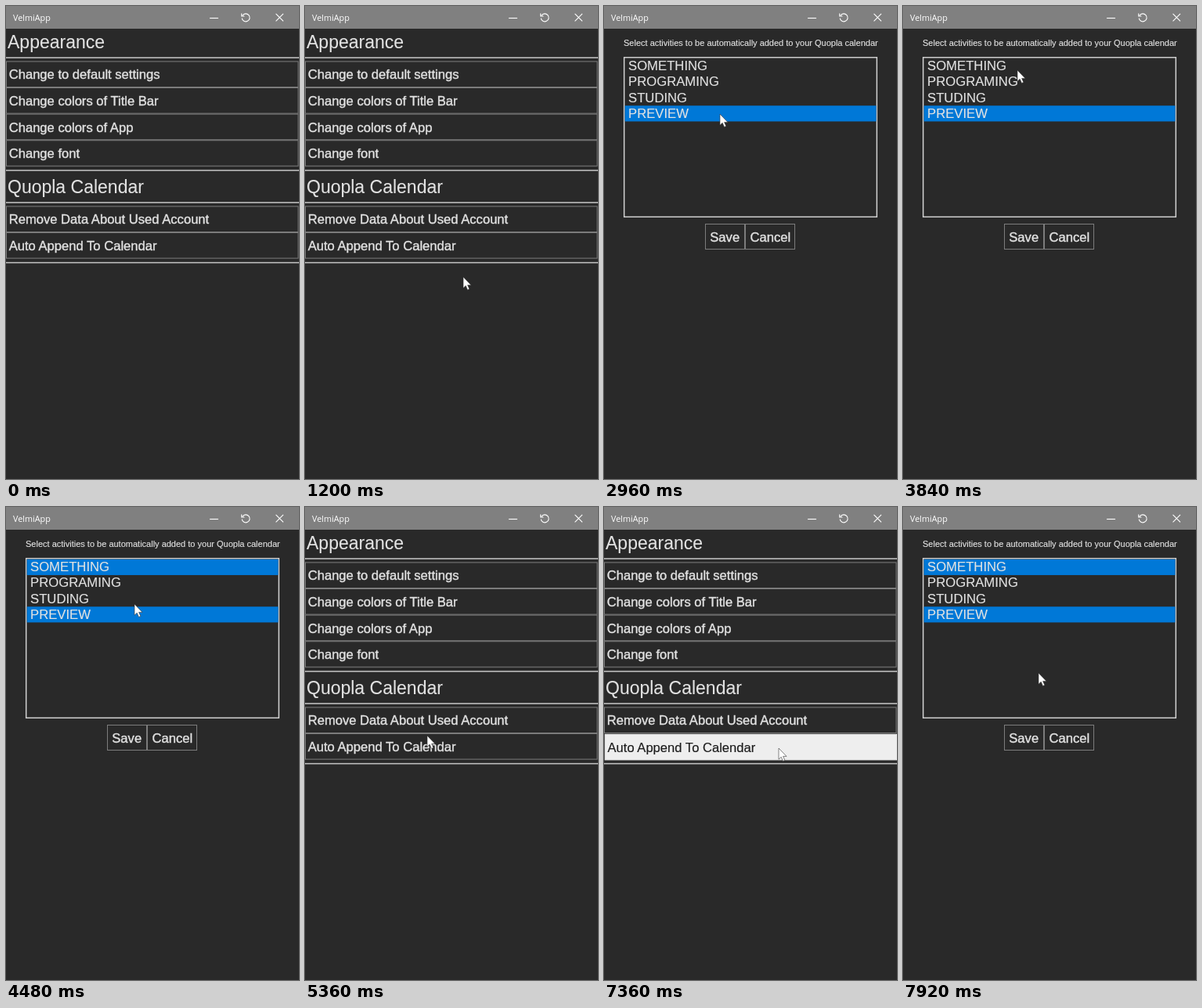
An HTML page for the animation above (8000 ms loop, 374x604 px).

```html
<!DOCTYPE html>
<html lang="en">
<head>
<meta charset="utf-8">
<title>Settings</title>
<style>
html, body { margin: 0; width: 100%; height: 100%; overflow: hidden; background: #292929; }
svg { display: block; width: 374px; height: 604px; }
text { font: 16.6px "Liberation Sans", Arial, sans-serif; fill: #e2e2e2; stroke: #e2e2e2; stroke-width: .4px; white-space: pre; }
.head { font-size: 23px; stroke-width: .1px; }
.note { font-size: 11px; stroke-width: .15px; }
.item { font-size: 16.7px; stroke-width: .15px; }
.bar { font: 10.8px "Open Sans", "Noto Sans", sans-serif; fill: #fff; stroke: none; }
.box { fill: none; stroke: #7c7c7c; }
.rule { fill: #bdbdbd; }
.pick { fill: #0078d7; }
.icon { fill: none; stroke: #fff; stroke-width: 1.1; }
.down { transform: translate(.8px, .8px); }
.down .box { fill: #eee; stroke: #eee; }
.down text { fill: #1c1c1c; stroke: #1c1c1c; stroke-width: .15px; }
</style>
</head>
<body>
<svg viewBox="0 0 374 604">
  <rect width="374" height="604" fill="#292929"/>
  <rect width="374" height="29" fill="#808080"/>
  <text class="bar" x="9" y="18.5">VelmiApp</text>
  <g class="icon">
    <path d="M260 15.5H271"/>
    <path d="M301.9 12.2A5 5 0 1 1 301.2 15.6M300.7 9.6V13H304.4"/>
    <path d="M344.5 9.8L354 19.3M354 9.8L344.5 19.3"/>
  </g>
  <g id="settings"></g>
  <g id="picker"></g>
  <path id="cursor" d="M0 0V14.2L3.2 11.2L5.5 16.4L7.9 15.4L5.6 10.4H10Z" fill="#fff" stroke="#333" stroke-width=".6"/>
</svg>
<script>
const LOOP = 8000, STEP = 80, PRESS = 160;
const [settings, picker, cursor] =
  ['settings', 'picker', 'cursor'].map(id => document.getElementById(id));

function add(parent, tag, attrs, content) {
  const el = document.createElementNS('http://www.w3.org/2000/svg', tag);
  for (const k in attrs) el.setAttribute(k, attrs[k]);
  if (content) el.textContent = content;
  return parent.appendChild(el);
}
const label = (parent, cls, x, y, s) => add(parent, 'text', { class: cls, x, y }, s);
const rect = (parent, cls, x, y, width, height) =>
  add(parent, 'rect', { class: cls, x, y, width, height });

function button(parent, x, y, w, h, s, pad) {
  const g = add(parent, 'g', {});
  rect(g, 'box', x + .5, y + .5, w - 1, h - 1);
  label(g, '', x + pad, y + 22.9, s);
  return g;
}

// A settings section: heading, stacked rows and a rule above and below the rows
function section(y, title, names) {
  const rowH = 33.6, top = y + 41.4;
  label(settings, 'head', 2, y + 25, title);
  const rows = names.map((s, i) => button(settings, 0, top + i * rowH, 373.5, rowH, s, 3.7));
  for (const ruleY of [top - 5.2, top + names.length * rowH + 4.3])
    rect(settings, 'rule', 0, ruleY, 374, 1.6);
  return rows;
}
section(29, 'Appearance',
  ['Change to default settings', 'Change colors of Title Bar', 'Change colors of App', 'Change font']);
const append = section(214, 'Quopla Calendar',
  ['Remove Data About Used Account', 'Auto Append To Calendar'])[1];

// Activity picker
label(picker, 'note', 25, 51.3, 'Select activities to be automatically added to your Quopla calendar');
add(picker, 'rect', { x: 25.7, y: 65.7, width: 322.6, height: 203.6, fill: 'none', stroke: '#d0d0d0', 'stroke-width': 1.5 });
const pickTime = { PREVIEW: 2960, SOMETHING: 4160 };
const picks = ['SOMETHING', 'PROGRAMING', 'STUDING', 'PREVIEW'].map((s, i) => {
  const h = 20.15, y = 66.8 + i * h;
  const bg = rect(picker, 'pick', 26.7, y, 320.8, h);
  label(picker, 'item', 31, y + 15.4, s);
  return { bg, time: pickTime[s] ?? Infinity };
});
const save = button(picker, 129, 278, 51, 33, 'Save', 6.3);
button(picker, 180, 278, 64, 33, 'Cancel', 6.5);

// Pointer moves: start, end, target x, y; it rests in between
const moves = [
  [960, 960, 176, 389], [960, 1360, 220, 318], [1520, 1840, 213, 309],
  [1920, 2400, 112, 76], [2400, 2640, 148, 138], [2960, 3360, 159, 87],
  [3440, 4000, 141, 80], [4160, 4480, 164, 124], [4480, 4960, 152, 305],
  [5120, 5360, 156, 292], [5360, 5920, 178, 391], [5920, 6400, 249, 350],
  [6400, 6720, 223, 308], [7600, 7920, 173, 212]
];

function pointAt(t) {
  let x = 0, y = 0;
  for (const [from, to, toX, toY] of moves) {
    if (t < from) break;
    const k = Math.min(1, (t - from) / (to - from || 1));
    const part = from === to ? 1 : k;
    x += (toX - x) * part;
    y += (toY - y) * part;
  }
  return [Math.round(x), Math.round(y)];
}

const appendClicks = [1520, 7360], saveClick = 5120;
const pressed = (t, at) => t >= at && t < at + PRESS;
const show = (el, on) => el.setAttribute('display', on ? 'inline' : 'none');

function draw(now) {
  const t = Math.floor(now % LOOP / STEP) * STEP;
  const opened = appendClicks.filter(at => t >= at + PRESS).length;
  const closed = t >= saveClick + PRESS ? 1 : 0;
  show(settings, opened === closed);
  show(picker, opened > closed);
  for (const { bg, time } of picks) show(bg, t >= time);
  append.classList.toggle('down', appendClicks.some(at => pressed(t, at)));
  save.classList.toggle('down', pressed(t, saveClick));
  show(cursor, t >= moves[0][0]);
  cursor.setAttribute('transform', `translate(${pointAt(t)})`);
}

let start;
function tick(now) {
  start ??= now;
  draw(now - start);
  requestAnimationFrame(tick);
}
draw(0);
requestAnimationFrame(tick);
</script>
</body>
</html>
```
